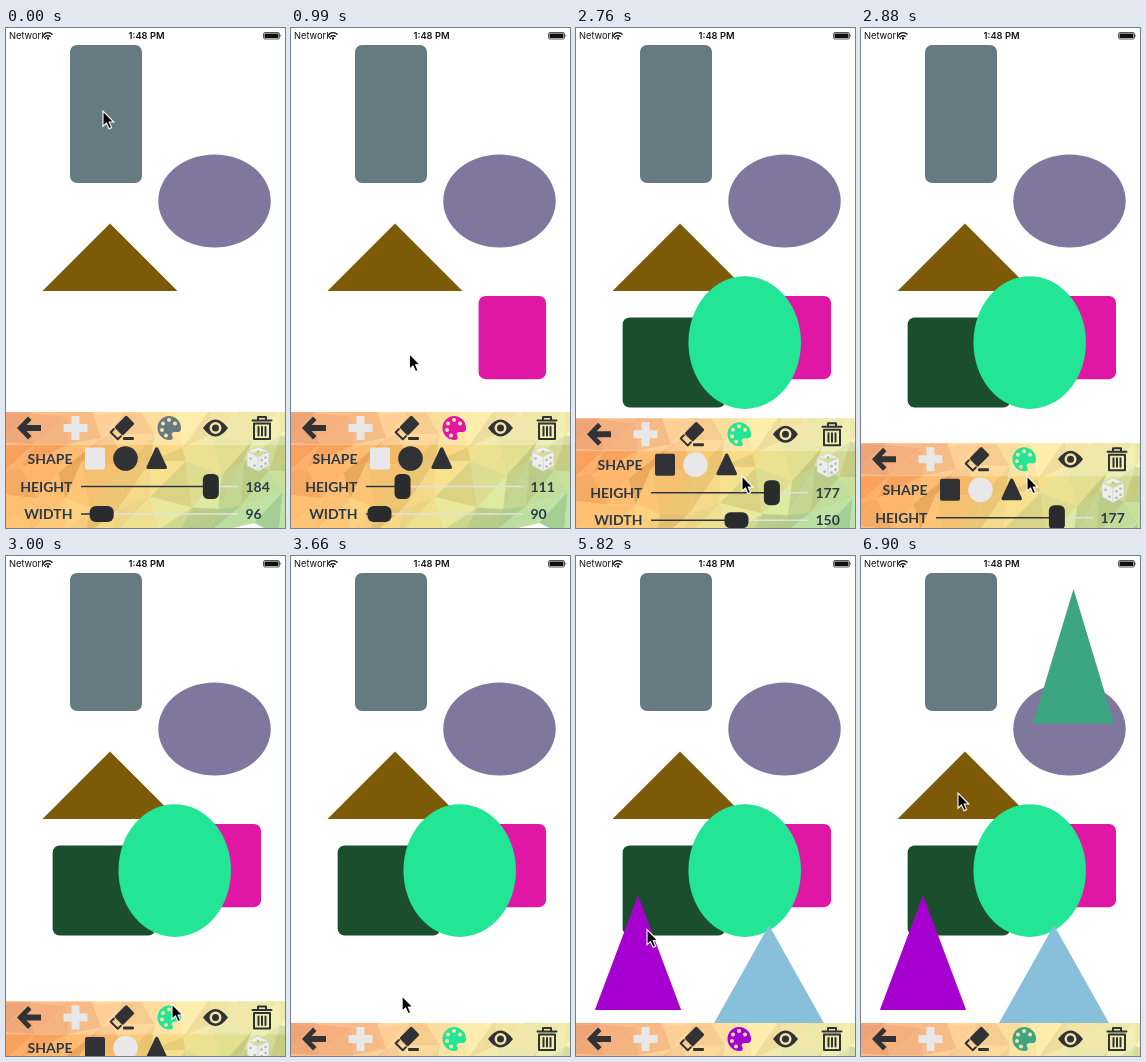
Write an HTML page that moves like this. It is 279 by 500 pixels and loops after 6.93 s.

```html
<!DOCTYPE html>
<html lang="en">
<head>
<meta charset="utf-8">
<title>Shape editor</title>
<style>
html, body { margin: 0; height: 100%; overflow: hidden; background: #fff; }
svg { display: block; width: 100vw; height: 100vh; }
.status { font: 9.3px Inter, sans-serif; fill: #111; }
.label { font: bold 14px Lato, sans-serif; fill: #2b3a48; }
.dark { fill: #303236; }
.line { fill: none; stroke: #303236; stroke-width: 2; stroke-linecap: round; stroke-linejoin: round; }
</style>
</head>
<body>
<svg viewBox="0 0 279 500">
  <g id="shapes"></g>

  <g class="status">
    <text x="3" y="11">Network</text>
    <text x="140.500" y="11" text-anchor="middle" font-weight="600">1:48 PM</text>
    <g transform="translate(42 11)" fill="none" stroke="#111" stroke-width="1.400">
      <path d="M-4.500-4.500a6.400 6.400 0 0 1 9 0M-2.600-2.300a3.700 3.700 0 0 1 5.200 0"/>
      <circle cy="-.6" r=".5"/>
    </g>
    <rect x="257.500" y="4.500" width="16" height="6.500" rx="1.500" fill="none" stroke="#111" stroke-width=".7"/>
    <rect x="258.500" y="5.500" width="14" height="4.500" rx=".6"/>
    <path d="M274.500 6.500q1.500 1.200 0 2.600z"/>
  </g>

  <g id="panel">
    <g id="mosaic"></g>
    <rect width="279" height="33" fill="#fff" opacity=".27"/>

    <path class="dark" transform="translate(23 16)" d="M-12 0L-1-11.500 2.500-8-2.500-3H12V3H-2.500L2.500 8-1 11.500Z"/>
    <path transform="translate(69.500 16)" fill="#e8e8e8" d="M-4-12H4V-4H12V4H4V12H-4V4H-12V-4H-4Z"/>
    <g class="dark" transform="translate(116 16)">
      <g transform="rotate(-45)">
        <rect x="-5" y="-6" width="17" height="12" rx="1.500"/>
        <path class="line" d="M-6.500-5H-11V5H-6.500"/>
      </g>
      <rect x="1" y="9" width="11" height="3" rx="1"/>
    </g>
    <path id="palette" transform="translate(163 16)" fill-rule="evenodd"/>
    <path class="dark" transform="translate(209.500 16)" fill-rule="evenodd"
      d="M-12.500 0Q0-17 12.500 0 0 17-12.500 0ZM-6 0a6 6 0 1 0 12 0a6 6 0 1 0-12 0ZM-3.500 0a3.500 3.500 0 1 1 7 0a3.500 3.500 0 1 1-7 0Z"/>
    <path class="line" transform="translate(256 16)"
      d="M-9.500-7.500H9.500M-4-8V-11H4V-8M-8-4.500V11H8V-4.500ZM-3.500-1V7.500M0-1V7.500M3.500-1V7.500"/>

    <g class="label">
      <text x="66.500" y="51.500" text-anchor="end">SHAPE</text>
      <text x="66.500" y="79.500" text-anchor="end">HEIGHT</text>
      <text x="66.500" y="107" text-anchor="end">WIDTH</text>
      <text id="hText" x="239.500" y="79.500"></text>
      <text id="wText" x="239.500" y="107"></text>
    </g>
    <g id="kinds">
      <rect x="79" y="35.500" width="20" height="22" rx="2"/>
      <circle cx="119.500" cy="46.500" r="12.300"/>
      <path d="M149 36.500q1.700-2.500 3.400 0l8.300 18q1 2.500-1.500 2.500h-17q-2.500 0-1.500-2.500z"/>
    </g>
    <g transform="translate(252 46.500)" fill="#eee" stroke="#c9cfc0" stroke-width=".8" stroke-linejoin="round">
      <path d="M0-12L11-7V7L0 13-11 7V-7ZM-11-7L0-2 11-7M0-2V13"/>
      <path fill="#b4bca8" stroke="#b4bca8" stroke-linecap="round" stroke-width="2.600"
        d="M0-7h.1M-7.500 0h.1M-3.500 7h.1M3.500 1.500h.1M7.500 5h.1M3.500 8h.1M7.500-1h.1"/>
    </g>
    <path d="M75 74.500H232M75 102H232" stroke="#e2e2dc" stroke-width="1.500"/>
    <path id="tracks" stroke="#303236" stroke-width="1.500"/>
    <rect id="hKnob" y="62" width="16" height="25" rx="5.500" fill="#2a2b2d"/>
    <rect id="wKnob" y="94" width="24" height="16" rx="6" fill="#2a2b2d"/>
  </g>

  <path id="cursor" d="M0 0V15.200L3.500 12 6 17.700 8.600 16.600 6.200 11H10.800Z" stroke="#fff" stroke-width="1.100"/>
</svg>
<script>
const LOOP = 6930, UNIT = 0.75;
const $ = id => document.getElementById(id);
const smooth = u => (u = Math.min(1, Math.max(0, u)), u * u * (3 - 2 * u));
const mix = (a, b, u) => a + (b - a) * u;

// time, kind, centre x, centre y, width, height, colour
const RECT = 0, OVAL = 1, TRI = 2;
const shapes = [
  [0, OVAL, 208.5, 173, 150, 124, '#80779f'],
  [0, TRI, 104, 229.3, 180, 90, '#7c5a08'],
  [0, RECT, 100, 86, 96, 184, '#667a82'],
  [360, RECT, 221.3, 309.5, 90, 111, '#e016a5'],
  [1410, RECT, 98, 334.5, 137, 120, '#1a4e2c'],
  [2580, OVAL, 168.7, 314.5, 150, 177, '#22e596'],
  [4380, TRI, 193, 436, 200, 178, '#88c0dc'],
  [5520, TRI, 62, 396.5, 115, 153, '#a500d0'],
  [6390, TRI, 212.5, 100.2, 108, 179, '#3ca581']
];

// start, end, and where the pointer arrives
const moves = [
  [0, 150, 217.5, 305],
  [540, 1170, 94, 331],
  [1620, 2010, 166, 311.5],
  [2580, 2730, 166, 448],
  [3300, 3450, 115, 440],
  [3570, 3720, 109, 440],
  [4050, 4260, 190, 438],
  [4560, 4620, 210, 437],
  [4620, 5040, 47, 409],
  [5340, 5490, 60, 390],
  [5790, 5970, 209, 168],
  [6090, 6300, 209, 95],
  [6570, 6900, 97, 237]
];

function shapeMarkup([, kind, cx, cy, w, h, color]) {
  const rx = w * UNIT / 2, ry = h * UNIT / 2;
  if (kind === OVAL) return `<ellipse cx="${cx}" cy="${cy}" rx="${rx}" ry="${ry}" fill="${color}"/>`;
  if (kind === TRI) return `<path d="M${cx} ${cy - ry}l${rx} ${2 * ry}h${-2 * rx}z" fill="${color}"/>`;
  return `<rect x="${cx - rx}" y="${cy - ry}" width="${2 * rx}" height="${2 * ry}" rx="7" fill="${color}"/>`;
}

function mosaicMarkup() {
  const cols = 10, rows = 4;
  const rand = n => { const v = Math.sin(n * 127.1 + 3.7) * 43758.5453; return v - Math.floor(v); };
  const point = (i, j) => [
    i * 31 - 8 + (rand(i + j * 17) - 0.5) * 22,
    j * 31 - 4 + (rand(i * 5 + j * 29 + 90) - 0.5) * 20
  ];
  const corners = [[246, 140, 78], [238, 226, 138], [250, 192, 112], [165, 212, 158]];
  let out = '';
  const tile = (points, seed) => {
    const u = smooth(points.reduce((s, p) => s + p[0], 0) / 837);
    const v = Math.min(1, Math.max(0, points.reduce((s, p) => s + p[1], 0) / 348));
    const tone = (rand(seed) - 0.5) * 34;
    const rgb = [0, 1, 2].map(k => Math.round(tone + mix(
      mix(corners[0][k], corners[1][k], u), mix(corners[2][k], corners[3][k], u), v)
      + (k < 2 ? 18 : 6) * Math.sin(u * Math.PI)));
    const color = `rgb(${rgb})`;
    out += `<polygon points="${points.join(' ')}" fill="${color}" stroke="${color}" stroke-width=".5"/>`;
  };
  for (let j = -1; j < rows; j++) {
    for (let i = -1; i < cols; i++) {
      const a = point(i, j), b = point(i + 1, j), c = point(i, j + 1), d = point(i + 1, j + 1);
      const seed = i * 2 + j * 41 + 200;
      tile([a, b, c], seed);
      tile([b, c, d], seed + 1);
    }
  }
  return `<clipPath id="area"><rect width="279" height="118"/></clipPath><g clip-path="url(#area)">${out}</g>`;
}

const hole = (x, y, r) => `M${x - r} ${y}a${r} ${r} 0 1 0 ${2 * r} 0a${r} ${r} 0 1 0 ${-2 * r} 0Z`;
$('palette').setAttribute('d',
  'M0-12A12 12 0 1 0 1 12C4.500 12 4 9 3 7.500 2 5 4 4 6 4H9C12 4 12 1 12 0A12 12 0 0 0 0-12Z' +
  hole(-7, 2, 2) + hole(-6, -4.5, 2) + hole(0, -8, 2) + hole(6, -4.5, 2) + hole(-3, 7.5, 2));
$('shapes').innerHTML = shapes.map(shapeMarkup).join('');
$('mosaic').innerHTML = mosaicMarkup();

function drawControls([, kind, , , w, h, color]) {
  const hx = 84.7 + (h - 90) * 1.278, wx = 88.5 + (w - 90) * 1.2;
  $('palette').setAttribute('fill', color);
  [...$('kinds').children].forEach((el, i) => el.setAttribute('fill', i === kind ? '#e8e8e8' : '#303236'));
  $('hText').textContent = h;
  $('wText').textContent = w;
  $('hKnob').setAttribute('x', hx - 8);
  $('wKnob').setAttribute('x', wx - 12);
  $('tracks').setAttribute('d', `M75 74.500H${hx}M75 102H${wx}`);
}

function draw(now) {
  const t = Math.floor(now % LOOP / 30) * 30;
  let current;
  shapes.forEach((s, i) => {
    const on = t >= s[0];
    $('shapes').children[i].style.display = on ? '' : 'none';
    if (on) current = s;
  });
  drawControls(current);

  const drop = 83 * smooth((t - 2680) / 480);
  $('panel').setAttribute('transform', `translate(0 ${384 + drop})`);

  let x = 97, y = 83;
  for (const [start, end, toX, toY] of moves) {
    const u = smooth((t - start) / (end - start));
    x = mix(x, toX, u);
    y = mix(y, toY, u);
  }
  $('cursor').setAttribute('transform', `translate(${x} ${y})`);
}

const began = performance.now();
function tick() {
  draw(performance.now() - began);
  requestAnimationFrame(tick);
}
tick();
</script>
</body>
</html>
```
